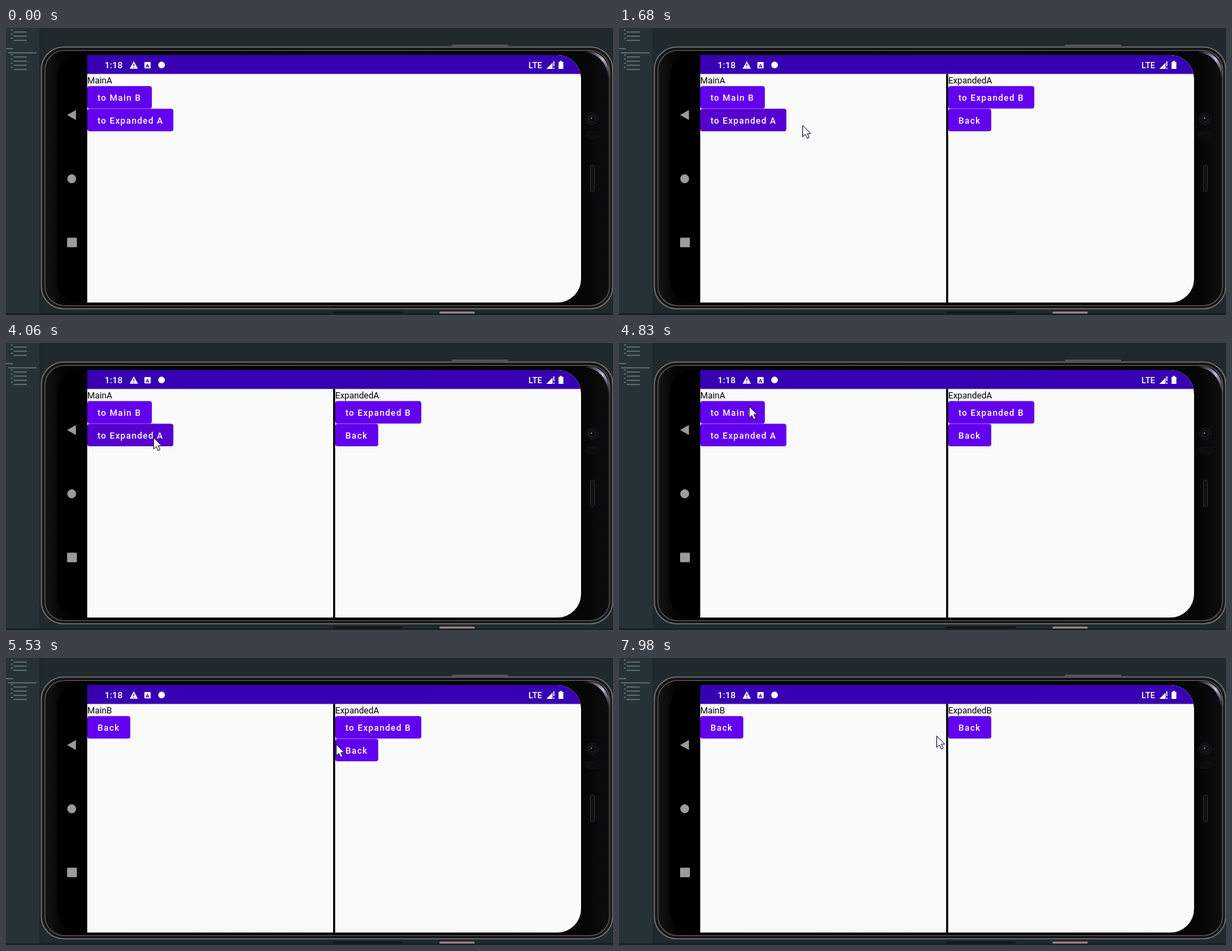
Animation, 874 px wide and 414 px high, one loop 8000 ms. Source, as an HTML page:

```html
<!DOCTYPE html>
<html lang="en">
<head>
<meta charset="utf-8">
<title>Two-pane navigation</title>
<style>
  html, body { margin: 0; width: 100%; height: 100%; overflow: hidden; background: #1f292e; }
  svg { display: block; width: 874px; height: 414px; font-family: Roboto, Inter, sans-serif; }
  .label { font-size: 12.55px; fill: #000; }
  .button text { font-size: 12.55px; font-weight: 500; letter-spacing: 1.08px; fill: #fff; }
  .status { font-size: 13.2px; font-weight: 500; fill: #fff; }
</style>
</head>
<body>
<svg viewBox="0 0 874 414">
  <defs>
    <linearGradient id="bezel">
      <stop offset="0" stop-color="#151515"/>
      <stop offset=".03" stop-color="#040404"/>
      <stop offset=".96" stop-color="#060607"/>
      <stop offset="1" stop-color="#0e0e10"/>
    </linearGradient>
    <linearGradient id="glow" x2="1" y2="1">
      <stop offset="0" stop-color="#b6a2d6" stop-opacity="0"/>
      <stop offset=".5" stop-color="#cabfe0"/>
      <stop offset="1" stop-color="#9a90b0" stop-opacity="0"/>
    </linearGradient>
    <clipPath id="screen"><rect x="73" y="39" width="755" height="357" rx="34"/></clipPath>
  </defs>

  <!-- Desktop behind the phone -->
  <rect width="874" height="414" fill="#1f292e"/>
  <rect width="49" height="414" fill="#263238"/>
  <path d="M49 0V414" stroke="#1b2429"/>
  <g id="minimap" fill="#66757c"></g>
  <rect y="411.5" width="874" height="2.5" fill="#182025"/>

  <!-- Phone body -->
  <path d="M642 25H723" stroke="#59595b" stroke-width="2"/>
  <rect x="471" y="409" width="100" height="3" fill="#131618"/>
  <rect x="624" y="409" width="51" height="3" rx="1.5" fill="#957e80"/>
  <rect x="51" y="27.5" width="822.5" height="377.5" rx="32" fill="#151515" stroke="#777" stroke-width="1.5"/>
  <rect x="56" y="32.5" width="813" height="368" rx="28" fill="url(#bezel)" stroke="#616161" stroke-width="1.2"/>
  <path d="M834 33.5Q865 36 869.5 72" fill="none" stroke="url(#glow)" stroke-width="4"/>
  <circle cx="844" cy="131" r="8.5" fill="#0d0e0f" stroke="#1a1b1d"/>
  <circle cx="844" cy="131" r="4.5" fill="#08090b" stroke="#292b2e"/>
  <circle cx="843" cy="130" r="1.2" fill="#777b80"/>
  <rect x="835" y="150" width="19" height="9" rx="4.5" fill="#0c0c0d" stroke="#151516"/>
  <rect x="841.5" y="198" width="6" height="38" rx="1.5" fill="#101011" stroke="#2c2c2e"/>

  <g clip-path="url(#screen)">
    <rect x="73" y="39" width="44" height="357" fill="#000"/>
    <rect x="117" y="39" width="711" height="357" fill="#fafafa"/>
    <rect x="117" y="39" width="711" height="27.3" fill="#3700b3"/>
    <g id="panes"></g>
  </g>

  <!-- System bars -->
  <g fill="#9b9b9d">
    <path d="M88 125.5L100.7 118.3V132.7Z"/>
    <circle cx="94.6" cy="217.5" r="6.4"/>
    <rect x="88" y="302.5" width="14" height="13.7" rx="1"/>
  </g>
  <text class="status" x="142" y="58">1:18</text>
  <text class="status" x="752.3" y="57.5" style="font-size:12.2px">LTE</text>
  <g fill="#fff">
    <path d="M184 48L190 58.7H178Z"/>
    <rect x="199.3" y="49" width="9" height="9.2" rx="1"/>
    <circle cx="224" cy="53.4" r="4.8"/>
    <path d="M778 59L787 50V59ZM788 48H789.5V55H788ZM788 57H789.5V59H788Z"/>
    <path d="M797.3 47.5H800.7V49H802.5V59H795.6V49H797.3Z"/>
  </g>
  <path d="M184 51.5V55M184 56.3V57.6" stroke="#3700b3" stroke-width="1.3"/>
  <text x="203.8" y="56.5" text-anchor="middle" font-size="8" font-weight="700" fill="#3700b3">A</text>

  <g id="pointer">
    <path d="M.5 .5V17L4.3 13.4L7 19.3L9.8 18L7.2 12.2H12Z" fill="#fff" stroke="#17102f"/>
    <circle id="tap" r="12" fill="#ffe000" fill-opacity=".55"/>
  </g>
</svg>

<script>
const LOOP = 8000;
const MAIN_X = 117, SIDE_X = 474;
const $ = id => document.getElementById(id);

// Two blocks of tiny code lines, short and long in turn
const bar = (x, y, width) => `<rect x="${x}" y="${y}" width="${width}" height="1.5"/>`;
let lines = bar(0, 29, 10) + bar(3, 35, 41);
for (const [top, bottom] of [[2, 17], [38, 59]]) {
  for (let y = top, long = false; y <= bottom; y += 3, long = !long) {
    lines += long ? bar(11, y, 19) : bar(7, y, 3);
  }
}
$('minimap').innerHTML = lines;

const button = (x, row, width, text, id = '') => {
  const y = 83.7 + row * 32.7;
  const box = attrs => `<rect x="${x}" y="${y}" width="${width}" height="32.5" rx="3.5" ${attrs}/>`;
  return `<g class="button">
    ${box('fill="#6200ee"')}
    ${id && box(`id="${id}" opacity="0"`)}
    <text x="${x + 14.8}" y="${y + 21.3}">${text}</text></g>`;
};
const pane = (id, x, title, buttons) =>
  `<g id="${id}"><text class="label" x="${x}" y="80">${title}</text>${buttons}</g>`;

$('panes').innerHTML =
  pane('mainA', MAIN_X, 'MainA',
    button(MAIN_X, 0, 93, 'to Main B') + button(MAIN_X, 1, 124, 'to Expanded A', 'press')) +
  pane('mainB', MAIN_X, 'MainB', button(MAIN_X, 0, 62, 'Back')) +
  '<g id="side"><rect x="471" y="66.3" width="3" height="330"/>' +
  pane('sideA', SIDE_X, 'ExpandedA',
    button(SIDE_X, 0, 124, 'to Expanded B') + button(SIDE_X, 1, 62, 'Back')) +
  pane('sideB', SIDE_X, 'ExpandedB', button(SIDE_X, 0, 62, 'Back')) + '</g>';

// Pointer moves: start, end, x, y
const moves = [
  [230, 1070, 204, 138],
  [1480, 1680, 264, 140],
  [1680, 2000, 400, 159],
  [2000, 2370, 517, 134],
  [3440, 3720, 212, 136],
  [4200, 4760, 187, 91],
  [5110, 5530, 475, 124],
  [5530, 5740, 539, 102],
  [7030, 7310, 506, 103],
  [7979, 7980, 457, 112]
];
const taps = [1280, 3300, 3920, 4900, 6530];

const ramp = (t, start, length) => Math.min(1, Math.max(0, (t - start) / length));
const smooth = v => v * v * (3 - 2 * v);
const between = (t, a, b) => t >= a && t < b;
const fade = (id, v) => $(id).setAttribute('opacity', v);

function pointerAt(t) {
  let x = 684, y = 405;
  for (const [start, end, toX, toY] of moves) {
    const k = smooth(ramp(t, start, end - start));
    x += (toX - x) * k;
    y += (toY - y) * k;
  }
  return [x, y];
}

function crossfade(from, to, k) {
  fade(from, 1 - k);
  fade(to, k);
}

function draw(now) {
  const t = now % LOOP;
  crossfade('mainA', 'mainB', smooth(ramp(t, 4970, 305)));
  crossfade('sideA', 'sideB', smooth(ramp(t, 6600, 305)));
  fade('side', between(t, 1400, 3440) || t >= 4060 ? 1 : 0);

  const pressed = (start, end) => ramp(t, start, 120) * (1 - ramp(t, end, 180));
  fade('press', 0.13 * (pressed(1280, 1760) + pressed(3920, 4340)));

  const [x, y] = pointerAt(t);
  $('pointer').setAttribute('transform', `translate(${x} ${y})`);
  fade('pointer', t < 230 ? 0 : 1);
  fade('tap', taps.some(tap => between(t, tap, tap + 140)) ? 1 : 0);
  requestAnimationFrame(draw);
}
requestAnimationFrame(draw);
</script>
</body>
</html>
```
